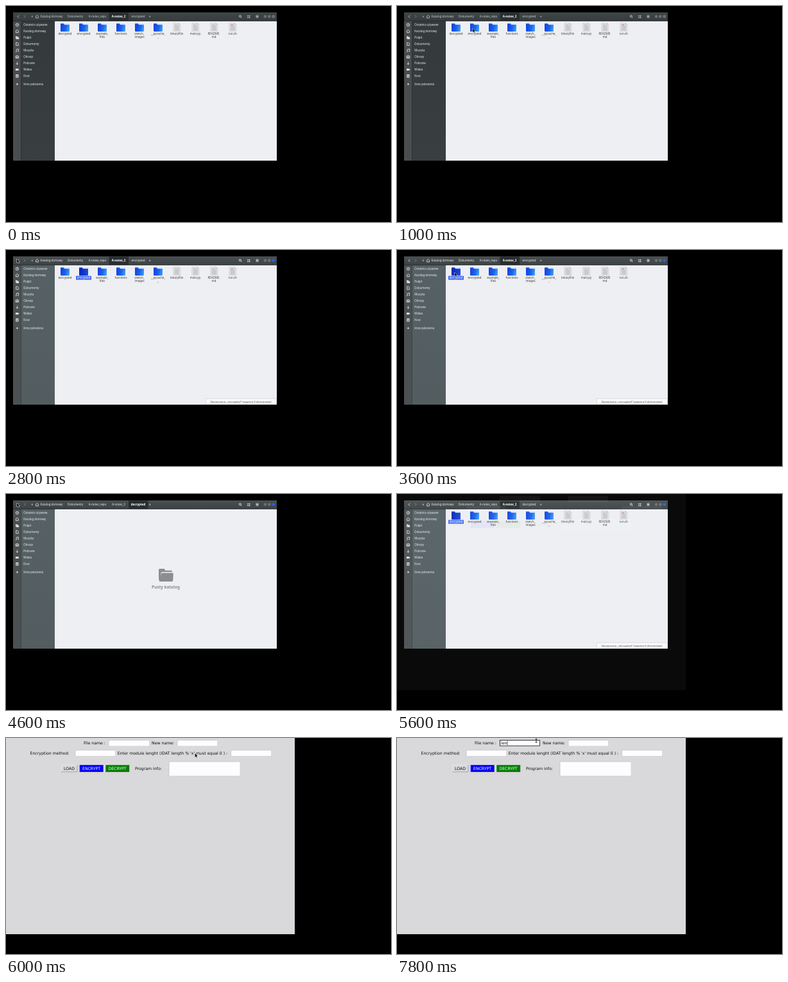
Animation, 600 px wide and 338 px high, one loop 8000 ms. Source, as an HTML page with a canvas:

```html
<!DOCTYPE html>
<html lang="pl">
<head>
<meta charset="utf-8">
<style>
html, body { margin: 0; width: 100%; height: 100%; overflow: hidden; background: #000; }
canvas { display: block; }
</style>
</head>
<body>
<canvas width="600" height="338"></canvas>
<script>
const ctx = document.querySelector('canvas').getContext('2d');
const LOOP = 8000, STEP = 200;
const UI = '"Noto Sans", sans-serif', TK = '"DejaVu Sans", sans-serif';

function rect(x, y, w, h, color) {
  ctx.fillStyle = color;
  ctx.fillRect(x, y, w, h);
}

function frame(x, y, w, h, color, width = 0.6) {
  ctx.strokeStyle = color;
  ctx.lineWidth = width;
  ctx.strokeRect(x, y, w, h);
}

function text(str, x, y, color, font, align = 'left') {
  ctx.font = font;
  ctx.textAlign = align;
  ctx.fillStyle = color;
  ctx.fillText(str, x, y);
}

// Path given relative to (x, y); filled and/or stroked.
function shape(d, x, y, fill, stroke, width = 0.8) {
  const path = new Path2D(d);
  ctx.save();
  ctx.translate(x, y);
  if (stroke) {
    ctx.strokeStyle = stroke;
    ctx.lineWidth = width;
    ctx.stroke(path);
  }
  if (fill) {
    ctx.fillStyle = fill;
    ctx.fill(path);
  }
  ctx.restore();
}

// ---- File manager ----
const ring = r => `M${r} 0A${r} ${r} 0 1 1 ${-r} 0A${r} ${r} 0 1 1 ${r} 0Z`;
const HOME = 'M-2.6 .2L0 -2.3L2.6 .2M-1.8 -.2V2.2H1.8V-.2';

// label, icon path, filled?
const places = [
  ['Ostatnio używane', ring(2.2) + 'M0 -1.2V.2H1', false],
  ['Katalog domowy', HOME, false],
  ['Pulpit', 'M-2.4 -2H-.4L.2 -1.2H1.8V-.6H-1.2L-2 2H-2.4ZM-.9 -.2H2.7V2.2H-1.6Z', true],
  ['Dokumenty', 'M-1.7 -2.3H.6L1.8 -1V2.3H-1.7Z', false],
  ['Muzyka', 'M-1.2 1.6V-1.6L2 -2.1V1.2M-1.2 1.6A.5 .5 0 1 1 -2 1.6M2 1.2A.5 .5 0 1 1 1.2 1.2', false],
  ['Obrazy', 'M-2.3 -1.2H-1L-.6 -2H.6L1 -1.2H2.3V2H-2.3ZM.8 .4A.8 .8 0 1 1 -.8 .4A.8 .8 0 1 1 .8 .4', false],
  ['Pobrane', 'M0 -2V2M-1.7 .4L0 2.1L1.7 .4', false],
  ['Wideo', 'M-2.4 -1.5H1V-.4L2.6 -1.3V1.3L1 .4V1.5H-2.4Z', true],
  ['Kosz', 'M-2 -2H2M-1.7 -1.2V2.2H1.7V-1.2ZM-.6 -.2V1.3M.6 -.2V1.3', false],
  ['Inne położenia', 'M-1.7 0H1.7M0 -1.7V1.7', false]
];

const items = [
  'decrypted', 'encrypted', 'example_/files', 'functions', 'sketch_/images',
  '__pycache_/_', 'binaryFile', 'main.py', 'README./md', 'run.sh'
];
const FOLDERS = 6;

function drawFolder(x, y, selected) {
  shape('M-5.5 -6H5.5V0H-5.5Z', x, y, '#e6ecf5', '#b8c6dc', 0.4);
  const blue = ctx.createLinearGradient(-7, 0, 7, 3);
  blue.addColorStop(0, selected ? '#0a28b4' : '#1244dc');
  blue.addColorStop(0.55, selected ? '#1038cc' : '#1c62ee');
  blue.addColorStop(1, selected ? '#1a50dc' : '#3fa4f6');
  shape('M-7 -6H-2L-1 -4.2H7V5.6Q7 6.4 6.2 6.4H-6.2Q-7 6.4 -7 5.6Z', x, y, blue);
}

function drawFile(x, y, accent) {
  shape('M-5.5 -7H2.5L5.5 -4V6.5H-5.5Z', x, y, '#dededf', '#bcbcbe', 0.5);
  shape('M2.5 -7V-4H5.5Z', x, y, '#c2c2c4');
  for (let i = 0; i < 5; i++) rect(x - 3.5, y - 4 + i * 2, i ? 7 : 4.5, 0.8, '#aeaeb0');
  if (accent) rect(x - 2.5, y - 4.5, 3, 1.3, '#d08080');
}

function drawListing(selected) {
  items.forEach((name, i) => {
    const x = 92 + i * 29, isSelected = name === selected;
    if (i < FOLDERS) drawFolder(x, 33.5, isSelected);
    else drawFile(x + 0.3, 33.3, name === 'run.sh');
    if (isSelected) rect(x - 12, 40.6, 24, 6, '#3d66f0');
    name.split('/').forEach((line, row) =>
      text(line, x, 45.1 + row * 5, isSelected ? '#fff' : '#404246', `4.4px ${UI}`, 'center'));
  });
}

function drawEmpty() {
  const gray = '#8c8d8f';
  shape('M0 1.5Q0 0 1.5 0H8Q9 0 9.5 1L10.3 2.8H19.5Q21 2.8 21 4.3V5H5.5Q4 5 3.7 6.5L2 18.5Q0 18 0 16.5Z', 238, 117, gray);
  shape('M6 0H21.5Q23 0 22.8 1.5L22.2 12Q22 13.6 20.5 13.6H2Q.6 13.6 .8 12L3.8 1.6Q4.2 0 6 0Z', 238, 123.4, gray);
  text('Pusty katalog', 249, 148.2, gray, `bold 6.4px ${UI}`, 'center');
}

function drawHeader(view) {
  const fg = view.focused ? '#e6e8e9' : '#c6cacb';
  const bar = ctx.createLinearGradient(0, 10, 0, 24);
  bar.addColorStop(0, view.focused ? '#4a5052' : '#414648');
  bar.addColorStop(1, view.focused ? '#3c4244' : '#363b3d');
  rect(11, 10, 411, 13.5, bar);
  rect(11, 23, 411, 0.6, '#282c2e');

  shape('M1 -2L-1 0L1 2', 19, 16.5, null, fg, 0.9);
  shape('M-1 -2L1 0L-1 2', 29, 16.5, null, '#8f9496');
  shape('M.8 -1.5L-.8 0L.8 1.5Z', 40.5, 16.5, fg);
  shape('M-.8 -1.5L.8 0L-.8 1.5Z', 224.5, 16.5, fg);
  shape(HOME, 48.5, 16.6, null, fg);

  const crumbs = [['Katalog domowy', 71], ['Dokumenty', 108], ['A-notes_repo', 142.5],
                  ['A-notes_2', 175.5], [view.leaf, 206]];
  const active = view.open ? 4 : 3;
  rect(crumbs[active][1] - 15, 10.5, 30.5, 12.5, '#292e30');
  crumbs.forEach(([label, x], i) =>
    text(label, x, 18.2, i === active ? '#fff' : fg, `${i === active ? 'bold 4.5' : '4.45'}px ${UI}`, 'center'));

  shape(ring(1.5) + 'M1.1 1.1L2.6 2.6', 364.8, 16, null, fg, 0.9);
  for (let i = 0; i < 3; i++) {
    if (i !== 1) {
      rect(376, 14.8 + i * 1.3, 1.4, 1.4, fg);
      rect(378.2, 14.8 + i * 1.3, 2.2, 1.4, fg);
    }
    rect(389.5, 14.5 + i * 1.5, 4, 0.9, fg);
  }
  for (const x of [404, 410.3]) shape(ring(1.9), x, 16.4, '#6b7173', '#8b9092', 0.5);
  shape(ring(2.2), 416.8, 16.4, view.focused ? '#2a62e8' : '#6b7173', view.focused ? '#2450b8' : '#8b9092', 0.5);
}

function drawSidebar(focused) {
  rect(11, 23.5, 12.5, 218.5, focused ? '#4b5153' : '#4a4d4e');
  const fill = ctx.createLinearGradient(0, 24, 0, 242);
  fill.addColorStop(0, focused ? '#566165' : '#343a3c');
  fill.addColorStop(1, focused ? '#535d60' : '#393e40');
  rect(23.5, 23.5, 52.5, 218.5, fill);
  places.forEach(([label, icon, filled], i) => {
    const y = i === 9 ? 122.3 : 29.5 + i * 10;
    shape(icon, 17.4, y, filled ? '#f0f0f0' : null, filled ? null : '#f0f0f0');
    text(label, 27.3, y + 1.6, '#eceeee', `4.45px ${UI}`);
  });
}

function drawManager(view) {
  rect(76, 23.5, 346, 218.5, '#eeeff3');
  drawSidebar(view.focused);
  drawHeader(view);
  if (view.open) drawEmpty();
  else drawListing(view.selected);
  if (view.status) {
    rect(311, 232.5, 111, 9.5, '#fafafb');
    frame(311.3, 232.8, 110.4, 9, '#c9cacd');
    text(`Zaznaczono „${view.status}” (zawiera 0 elementów)`, 366, 239.2, '#3a3c40', `4.3px ${UI}`, 'center');
  }
}

function managerView(t) {
  const view = { focused: t >= 1400, leaf: t < 3800 ? 'encrypted' : 'decrypted' };
  view.open = (t >= 1600 && t < 2600) || (t >= 3800 && t < 4800);
  if (t >= 3600) view.selected = 'decrypted';
  else if (t >= 1400) view.selected = 'encrypted';
  if (t >= 5000) view.status = 'decrypted';
  else if (t >= 2800 && t < 3800) view.status = 'encrypted';
  return view;
}

// ---- Encryption form ----
function field(x, y, w, h) {
  rect(x, y, w, h, '#fdfcfe');
  shape(`M0 ${h}V0H${w}`, x, y, null, '#b4b3b5', 0.6);
}

function button(label, x, w, color, fg) {
  rect(x, 42, w, 11, color);
  shape(`M0 11V0H${w}`, x, 42, null, 'rgba(255,255,255,.6)', 0.6);
  shape(`M0 11H${w}V0`, x, 42, null, 'rgba(0,0,0,.4)', 0.6);
  text(label, x + w / 2, 49.8, fg, `6.2px ${TK}`, 'center');
}

function drawForm(t) {
  rect(0, 0, 450, 307, '#d9d8da');
  const labels = [
    ['File name :', 121, 10], ['New name:', 227, 10],
    ['Encryption method:', 37.5, 25.7],
    ["Enter module lenght (IDAT length % 'x' must equal 0 ) :", 173.7, 25.7],
    ['Program info:', 201, 49.8]
  ];
  labels.forEach(([label, x, y]) => text(label, x, y, '#101010', `6.2px ${TK}`));
  field(160, 3.3, 63, 9);
  field(267, 3.3, 62, 9);
  field(108, 19, 62, 9);
  field(350.5, 19, 62.5, 9);
  field(254, 37, 110.5, 22);
  button('LOAD', 86, 25, '#d9d8da', '#101010');
  button('ENCRYPT', 114.5, 37, '#0000fa', '#fff');
  button('DECRYPT', 155, 37, '#008000', '#fff');

  if (t >= 6600) {
    frame(160.4, 3.5, 62.2, 8.7, '#111', 0.8);
    const typed = 'len'.slice(0, Math.max(0, (t - 7200) / STEP));
    text(typed, 162, 10, '#101010', `6.2px ${TK}`);
    const caret = 162.2 + ctx.measureText(typed).width;
    if (t !== 7200) rect(caret, 4.5, 0.7, 6.8, '#111');
  }
}

// ---- Pointer ----
const pointerPath = [
  [200, 355, 3], [1000, 118, 35], [1600, 118, 35], [2200, 10, 13], [2400, 17, 14],
  [2800, 17, 14], [3400, 90, 35], [4000, 90, 35], [4600, 17, 14], [4999, 17, 14],
  [6000, 294.5, 24], [6600, 217, 5], [6800, 217, 4.3], [LOOP, 217, 4.3]
];

function drawPointer(t) {
  if (t < 200 || (t >= 5000 && t < 6000)) return;
  const i = pointerPath.findIndex(p => p[0] > t);
  const [t0, x0, y0] = pointerPath[i - 1], [t1, x1, y1] = pointerPath[i];
  const u = (t - t0) / (t1 - t0), k = u * u * (3 - 2 * u);
  const x = x0 + (x1 - x0) * k, y = y0 + (y1 - y0) * k;
  if (t >= 6600) shape('M-1.4 -2.6H1.4M0 -2.6V2.6M-1.4 2.6H1.4', x, y, null, '#111', 0.9);
  else shape('M0 0V6L1.4 4.7L2.3 6.8L3.3 6.4L2.4 4.3H4.2Z', x, y, '#111', '#fff', 0.9);
}

function draw(now) {
  const t = Math.floor((now % LOOP) / STEP) * STEP;
  rect(0, 0, 600, 338, '#000');
  if (t < 6000) drawManager(managerView(t));
  if (t >= 5600) {
    ctx.globalAlpha = Math.min(1, (t - 5587) / 300);
    drawForm(t);
    ctx.globalAlpha = 1;
  }
  drawPointer(t);
}

const start = performance.now();
function tick() {
  draw(performance.now() - start);
  requestAnimationFrame(tick);
}
tick();
</script>
</body>
</html>
```
